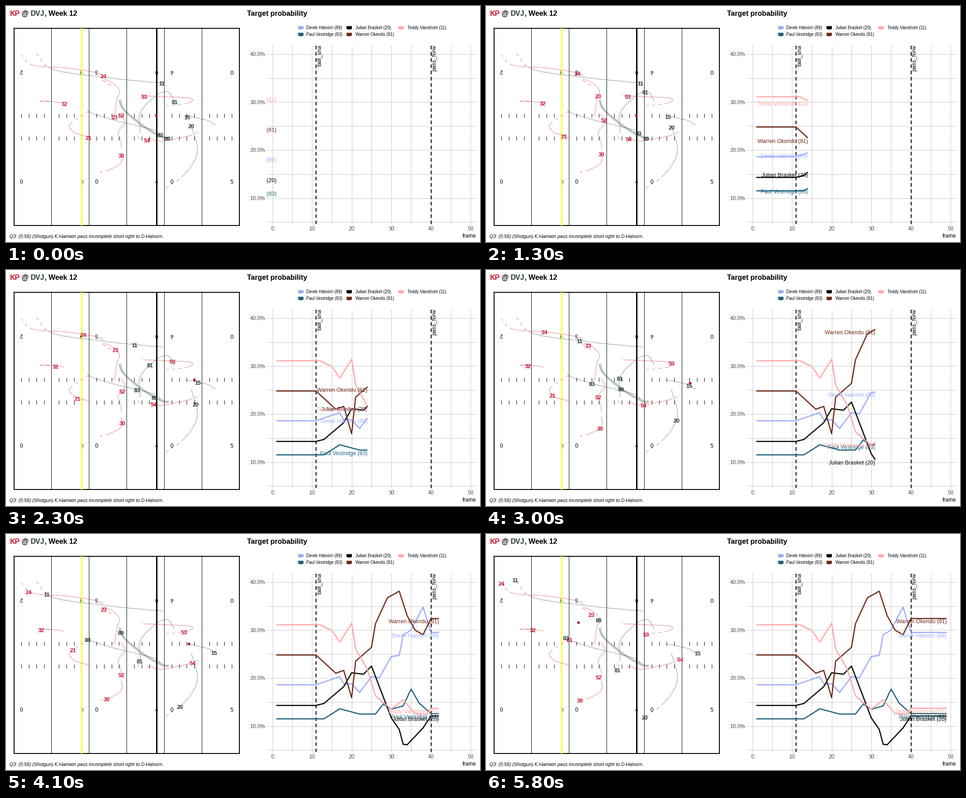
Recreate the animation shown at these times as a matplotlib script. Size 1058 by 529 pixels, loop 5.9 s.

```python
import numpy as np
import matplotlib.pyplot as plt
from matplotlib.animation import FuncAnimation
from matplotlib.patches import Rectangle

W, H, DPI = 1058, 529, 64
PT = 72 / DPI
FRAMES, STEPS = 59, 49
SNAP, PASS = 11, 40

plt.rcParams["font.family"] = "Liberation Sans"
RED, GREEN, GRID = "#c8102e", "#203731", "#cccccc"

# Each route passes its six points at these times
BEATS = np.array([0, 10, 17, 30, 39, 48])
AWAY = {
    24: [(217, 156), (208, 151), (197, 148), (130, 138), (59, 132), (34, 109)],
    53: [(308, 201), (309, 201), (330, 202), (414, 207), (405, 217), (357, 224)],
    32: [(130, 217), (128, 217), (122, 216), (93, 213), (75, 213), (104, 214)],
    23: [(242, 247), (247, 209), (253, 191), (228, 167), (216, 166), (235, 179)],
    52: [(257, 243), (261, 251), (266, 261), (250, 284), (258, 311), (251, 320)],
    30: [(257, 333), (257, 330), (258, 333), (254, 354), (229, 367), (209, 372)],
    21: [(184, 294), (177, 291), (169, 289), (148, 280), (143, 264), (186, 235)],
    54: [(314, 299), (317, 297), (321, 296), (351, 302), (409, 290), (433, 280)],
}
HOME = {
    11: [(347, 172), (347, 172), (334, 171), (208, 158), (103, 141), (64, 101)],
    81: [(376, 213), (361, 192), (345, 194), (298, 241), (299, 277), (293, 304)],
    89: [(360, 295), (360, 295), (351, 294), (301, 265), (260, 228), (251, 192)],
    83: [(344, 287), (343, 287), (331, 278), (236, 254), (187, 238), (178, 231)],
    15: [(404, 247), (405, 247), (409, 247), (453, 257), (462, 264), (472, 266)],
    20: [(413, 268), (413, 269), (416, 276), (425, 335), (397, 378), (354, 410)],
}

# name, jersey, colour, turning points (step, percent)
TARGETS = [
    ("Derek Halvorn", 89, "#9eacff",
     [(11, 18.6), (17, 20.3), (18, 18.8), (20, 18.8), (22, 17), (25, 20.3),
      (27, 20.1), (30, 24.5), (32, 24.7), (33, 29), (35, 30), (38, 34.8), (40, 29.5)]),
    ("Paul Vestridge", 83, "#20647f",
     [(13, 11.5), (17, 13.6), (22, 12.5), (26, 12.5), (28, 14.6), (30, 13.5),
      (33, 14.2), (35, 17.7), (37, 14.8), (40, 12.6)]),
    ("Julian Brasket", 20, "#0b0708",
     [(11, 14.3), (13, 14.7), (18, 18.2), (20, 21.1), (23, 20.8), (25, 22.5),
      (30, 11.7), (32, 9.3), (33, 6.2), (34, 6.1), (38, 9.6), (40, 12.1)]),
    ("Warren Okendu", 81, "#6f2b17",
     [(11, 24.8), (16, 21), (18, 21.6), (20, 15.9), (21, 23.5), (25, 26.4), (26, 31.3),
      (29, 36.7), (32, 38.1), (34, 33), (36, 30), (38, 29), (40, 32.4)]),
    ("Teddy Vanstrom", 11, "#ffa8a8",
     [(12, 31.1), (15, 29.9), (17, 27.5), (20, 31.4), (21, 26.1), (24, 21.7), (26, 16.3),
      (30, 13.5), (33, 15.5), (36, 12.6), (39, 12.4), (40, 13.7)]),
]


def route(points, t):
    """Smooth curve through points, one per beat; returns rows of (x, y)."""
    p = np.array(points, float)
    m = np.gradient(p, BEATS, axis=0)
    i = np.clip(np.searchsorted(BEATS, t, side="right") - 1, 0, len(BEATS) - 2)
    dt = (BEATS[i + 1] - BEATS[i])[:, None]
    u = (t - BEATS[i])[:, None] / dt
    return ((1 + 2 * u) * (1 - u) ** 2 * p[i] + u * (1 - u) ** 2 * dt * m[i]
            + u * u * (3 - 2 * u) * p[i + 1] + u * u * (u - 1) * dt * m[i + 1])


def ramp(t, start, length):
    return np.clip((t - start) / length, 0, 1)[:, None]


def ball_flight(passer, t):
    """Rest on the line, snap to the passer, stay in hand, then fly."""
    spot, landing = np.array([334, 244]), np.array([205, 197])
    p = spot + (passer + (1, -5) - spot) * ramp(t, 14, 10)
    return p + (landing - p) * ramp(t, PASS - 1, 9)


def px(step):
    return 594 + 8.85 * np.asarray(step)


def py(pct):
    return 537.6 - 10.76 * np.asarray(pct)


fig = plt.figure(figsize=(W / DPI, H / DPI), dpi=DPI, facecolor="white")
ax = fig.add_axes([0, 0, 1, 1])
# Whole numbers are pixel centres
ax.set_xlim(-0.5, W - 0.5)
ax.set_ylim(H - 0.5, -0.5)
ax.axis("off")


def line(x, y, color="black", width=1.0, z=1, **kw):
    return ax.plot(x, y, color=color, lw=width * PT, zorder=z, solid_capstyle="butt",
                   dash_capstyle="butt", **kw)[0]


def text(x, y, s, size, color="black", z=5, **kw):
    """Text whose capitals are centred on y."""
    drop = -0.36 if kw.get("rotation") == 180 else 0.36
    return ax.text(x, y + drop * size, s, fontsize=size * PT, color=color, zorder=z,
                   va="baseline", rotation_mode="anchor", **kw)


def box(x, y, w, h, **kw):
    return ax.add_patch(Rectangle((x, y), w, h, **kw))


def titles():
    for x, s, color in ((8, "KP", RED), (34, "@", "black"), (54, "DVJ", GREEN),
                        (85, ", Week 12", "black"), (538, "Target probability", "black")):
        text(x, 15.5, s, 16, color, weight="bold")
    text(8, 516, "Q3: (5:56) (Shotgun) K.Hamwin pass incomplete short right to D.Halvorn.",
         10.67, style="italic")


def field():
    left, top, right, bottom = 17, 49.5, 520.4, 491.5
    yard = (right - left) / 30
    box(left, top, right - left, bottom - top, fill=False, ec="black", lw=2 * PT, zorder=2)
    for k in range(1, 30):
        x = left + k * yard
        if k % 5 == 0:
            line([x, x], [top, bottom])
        for y in (240, 291):
            line([x, x], [y, y + 9])
    for k, far, near in zip((1, 9, 11, 19, 21, 29), "203040", "030405"):
        x = left + k * yard
        text(x, 147, far, 12.4, z=1.5, ha="center", rotation=180)
        text(x, 393, near, 12.4, z=1.5, ha="center")
    for k, color, width in ((9, "#ffff5e", 4), (19, "black", 3)):
        x = left + k * yard
        line([x, x], [top, bottom], color, width, 2.1)


def chart():
    x0, x1, y0, y1 = 581, 1049, 88, 488
    panel = box(x0, y0, x1 - x0, y1 - y0, fc="none", ec="none")
    for p in range(5, 41, 5):
        line([x0, x1], [py(p)] * 2, GRID, 1.1)
        if p % 10 == 0:
            text(578, py(p), f"{p}.0%", 12, "#4d4d4d", ha="right")
    for s in range(0, 51, 5):
        line([px(s)] * 2, [y1, y0], GRID, 1.1)
        if s % 10 == 0:
            text(px(s), 498, s, 12, "#4d4d4d", ha="center")
    text(1049, 514, "frame", 12, ha="right")
    for s, event in ((SNAP, "ball_snap"), (PASS, "pass_forward")):
        line([px(s)] * 2, [y1, y0], width=2, z=2, ls=(0, (4, 3)))
        label = ax.text(px(s) + 11, py(40), event, fontsize=12.7 * PT, ha="center", va="baseline",
                        rotation=90, rotation_mode="anchor", clip_on=True)
        label.set_clip_path(panel)
    return panel


def legend():
    for k, (name, num, color, _) in enumerate(TARGETS):
        col, row = divmod(k, 2)
        x, y = (651, 759, 875)[col], 48 + 15 * row
        box(x, y - 4, 12, 7, fc=color, ec="none")
        box(x + 4, y + 3, 4, 1, fc=color, ec="none")
        text((670, 779, 895)[col], y, f"{name} ({num})", 9.5)


titles()
field()
panel = chart()
legend()

steps = np.arange(STEPS)
before = np.linspace(0, PASS - 1, 160)
after = np.linspace(PASS - 1, STEPS - 1, 40)

players = []
for team, color in ((AWAY, RED), (HOME, GREEN)):
    for num, points in team.items():
        width = 5 if num == 89 else 1.8
        for t, style in ((before, "-"), (after, (0, (4, 4)))):
            line(*route(points, t).T, color, width, 3, alpha=0.3, ls=style)
        label = text(0, 0, num, 12.5, color, 6, weight="bold", ha="center")
        players.append((label, route(points, steps) + (0, 6)))

ball_path = ball_flight(route(HOME[15], steps), steps)
ball = line([], [], "#a51c1c", z=7, marker="o", ms=6 * PT, mew=0)

curves = []
for name, num, color, turns in TARGETS:
    y = py(np.interp(steps + 1, *zip(*turns)))
    curve = line([], [], color, 2.6, 4, solid_joinstyle="round")
    label = text(0, 0, f"{name} ({num})", 12.4, color, 5, ha="right", clip_on=True)
    label.set_clip_path(panel)
    curves.append((curve, label, y))


def update(i):
    k = min(i, STEPS - 1)
    for label, spots in players:
        label.set_position(spots[k])
    ball.set_data(*ball_path[k:k + 1].T)
    x = px(steps[:k + 1] + 1)
    for curve, label, y in curves:
        curve.set_data(x, y[:k + 1])
        label.set_position((x[-1], y[k] + 11))


anim = FuncAnimation(fig, update, frames=FRAMES, interval=100, repeat=True, repeat_delay=0)
plt.show()
```
